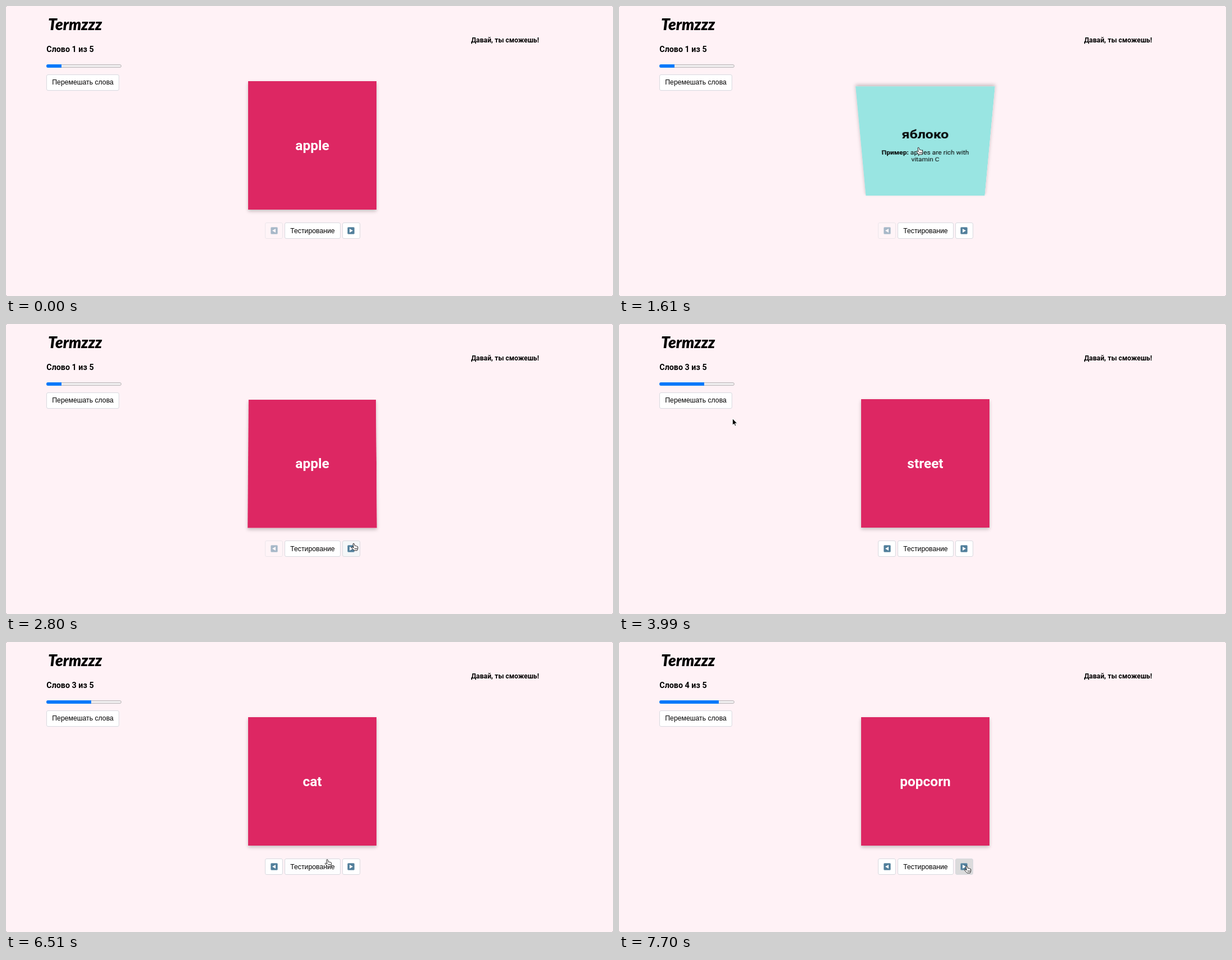
Write an HTML page that moves like this. It is 1083 px wide and 517 px high and loops after 8 s.

```html
<!DOCTYPE html>
<html lang="ru">
<head>
<meta charset="utf-8">
<title>Карточки</title>
<style>
html, body { margin: 0; width: 100%; height: 100%; overflow: hidden; background: #8d898b; }
#stage { position: relative; width: 1083px; height: 517px; overflow: hidden; border-radius: 2px;
  background: #fff2f6; color: #000; font: 12.24px Roboto, sans-serif; }
#stage > * { position: absolute; box-sizing: border-box; }
.line { font-weight: 700; line-height: 20px; white-space: nowrap; }
#logo { left: 75px; top: 12px; font: italic 900 28px/40px Lato, sans-serif; }
#count { left: 72.3px; top: 66.5px; font-size: 14.3px; }
#cheer { right: 132px; top: 51.2px; }
#bar { left: 72px; top: 104px; width: 133.5px; height: 6px; border: 1px solid #bab4b7;
  border-radius: 3px; background: #efedee; }
#fill { position: absolute; left: -1px; top: -1px; height: 6px; border-radius: 3px 0 0 3px; background: #0879fa; }
.btn { display: flex; align-items: center; justify-content: center; height: 29px; border: 1px solid #d8d9df;
  border-radius: 3px; font: 12.24px "Liberation Sans", Arial, sans-serif; white-space: nowrap; }
.btn svg { width: 13px; height: 13px; }
.btn rect { fill: #527f9b; stroke: #8aabbd; }
.btn path { fill: #fff; }
#scene { left: 432px; top: 134px; width: 229px; height: 229px; perspective: 765px; }
#card { width: 100%; height: 100%; transform-style: preserve-3d; box-shadow: 0 3px 6px rgba(0,0,0,.22); }
.face { position: absolute; inset: 0; display: flex; flex-direction: column; align-items: center;
  justify-content: center; text-align: center; backface-visibility: hidden; }
.face h1 { margin: 0; font-size: 24.48px; line-height: 29px; font-weight: 700; }
.face p { margin: 17px 0 0; line-height: 14.3px; }
#front { background: #dd2763; color: #fff; }
#back { background: #99e5e2; transform: rotateX(180deg); }
#cursor { left: 0; top: 0; width: 18px; height: 20px; overflow: visible; }
#cursor path { stroke-linejoin: round; }
</style>
</head>
<body>
<div id="stage">
  <div id="logo">Termzzz</div>
  <div id="count" class="line"></div>
  <div id="cheer" class="line">Давай, ты сможешь!</div>
  <div id="bar"><div id="fill"></div></div>
  <div id="scene"><div id="card">
    <div id="front" class="face"><h1 id="word"></h1></div>
    <div id="back" class="face"><h1>яблоко</h1><p><b>Пример:</b> apples are rich with<br>vitamin C</p></div>
  </div></div>
  <div id="shuffle" class="btn">Перемешать слова</div>
  <div id="prev" class="btn"><svg viewBox="0 0 13 13"><rect x=".5" y=".5" width="12" height="12" rx="1.5"/><path d="M9 3V10L3 6.5Z"/></svg></div>
  <div id="test" class="btn">Тестирование</div>
  <div id="next" class="btn"><svg viewBox="0 0 13 13"><rect x=".5" y=".5" width="12" height="12" rx="1.5"/><path d="M4 3V10L10 6.5Z"/></svg></div>
  <svg id="cursor">
    <path id="hand" fill="#fff" stroke="#222" d="M-1 1Q0-.8 1.2 .8L2.6 4.8Q3.6 3.8 4.4 5Q5.4 4.2 6.2 5.4Q7.6 5 7.8 7L7.6 10L6.5 12.8H1.2L-3.4 8Q-3.7 6.3-2 6.6L.2 8Z M2.5 8.5V10.5M4.2 8.5V10.5M5.8 8.5V10.5"/>
    <path id="arrow" fill="#000" stroke="#fff" d="M0 0V12L2.8 9.5L4.6 13.5L6.5 12.6L4.7 8.8H8.4Z"/>
  </svg>
</div>
<script>
const $ = id => document.getElementById(id);
const DURATION = 8000, STEP = 70, FLIP = 600, FADE = 150;

// x, y, width, height of everything clickable
const zones = {
  shuffle: [72.3, 121.8, 129.5, 29],
  prev: [462, 386.3, 32, 29],
  test: [497.3, 386.3, 99.3, 29],
  next: [599.7, 386.3, 32, 29],
  scene: [432, 134, 229, 229]
};
const buttons = ['shuffle', 'prev', 'test', 'next'];
for (const id of buttons) {
  const [x, y, w] = zones[id];
  Object.assign($(id).style, { left: x + 'px', top: y + 'px', width: w + 'px' });
}

// time, x, y of the pointer tip
const path = [
  [210, 526, 412], [420, 526, 262], [490, 526, 262], [630, 528, 255], [700, 528, 255],
  [910, 534, 252], [2030, 534, 252], [2240, 546, 257], [2380, 546, 257], [2800, 620, 391],
  [2940, 621, 400], [3500, 621, 400], [4130, 142, 135], [6020, 142, 135], [6540, 577, 390],
  [6790, 614, 397], [7140, 545, 399], [7490, 620, 399]
];
const presses = [
  ['next', 2870, 3010], ['next', 3290, 3430], ['shuffle', 4480, 4620],
  ['shuffle', 5180, 6020], ['next', 7560, 8000]
];
// time, position in the deck, word
const words = [[0, 1, 'apple'], [2940, 2, 'popcorn'], [3360, 3, 'street'], [6020, 3, 'cat'], [7700, 4, 'popcorn']];

const clamp = v => Math.max(0, Math.min(1, v));
const mix = (a, b, k) => a + (b - a) * k;
const blend = (a, b, k) => a.map((v, i) => mix(v, b[i], k));

function pointer(t) {
  const i = path.findLastIndex(p => p[0] <= t);
  if (i < 0) return [-99, -99];
  const a = path[i], b = path[i + 1] || a;
  const u = clamp((t - a[0]) / (b[0] - a[0] || 1)), k = u * u * (3 - 2 * u);
  return [mix(a[1], b[1], k), mix(a[2], b[2], k)];
}

function inside(id, [px, py]) {
  const [x, y, w, h] = zones[id];
  return px >= x && px <= x + w && py >= y && py <= y + h;
}

// share of the last FADE ms during which a state was on
function faded(t, isOn) {
  let on = 0;
  for (let i = 0; i < 15; i++) on += isOn(t - i * FADE / 15);
  return on / 15;
}

// cubic-bezier(.25, .1, .25, 1)
function ease(x) {
  if (x <= 0 || x >= 1) return clamp(x);
  let lo = 0, hi = 1;
  for (let i = 0; i < 20; i++) {
    const u = (lo + hi) / 2, v = 1 - u;
    if (.75 * u * v + u ** 3 < x) lo = u; else hi = u;
  }
  const v = 1 - lo;
  return .3 * lo * v * v + 3 * lo * lo * v + lo ** 3;
}

function draw(t) {
  const [, number, word] = words.findLast(w => w[0] <= t);
  $('count').textContent = `Слово ${number} из 5`;
  $('fill').style.width = number * 26.6 + 'px';
  $('word').textContent = word;

  const turn = ease((t - 1298) / FLIP) - ease((t - 2298) / FLIP);
  $('card').style.transform = `rotateX(${180 * turn}deg)`;

  for (const id of buttons) {
    const disabled = id === 'prev' && number === 1;
    const hover = disabled ? 0 : faded(t, s => inside(id, pointer(s)));
    const press = faded(t, s => presses.some(([b, from, to]) => b === id && s >= from && s < to));
    const color = blend(blend([255, 255, 255], [226, 230, 234], hover), [219, 219, 220], press);
    $(id).style.background = disabled ? '#fff6f9' : `rgb(${color})`;
    $(id).style.opacity = disabled ? .5 : 1;
  }

  const tip = pointer(t), clickable = Object.keys(zones).some(id => inside(id, tip));
  $('cursor').style.transform = `translate(${tip[0]}px, ${tip[1]}px)`;
  $('hand').style.display = clickable ? '' : 'none';
  $('arrow').style.display = clickable ? 'none' : '';
}

const start = performance.now();
function frame() {
  const t = (performance.now() - start) % DURATION;
  draw(Math.floor(t / STEP) * STEP);
  requestAnimationFrame(frame);
}
frame();
</script>
</body>
</html>
```
